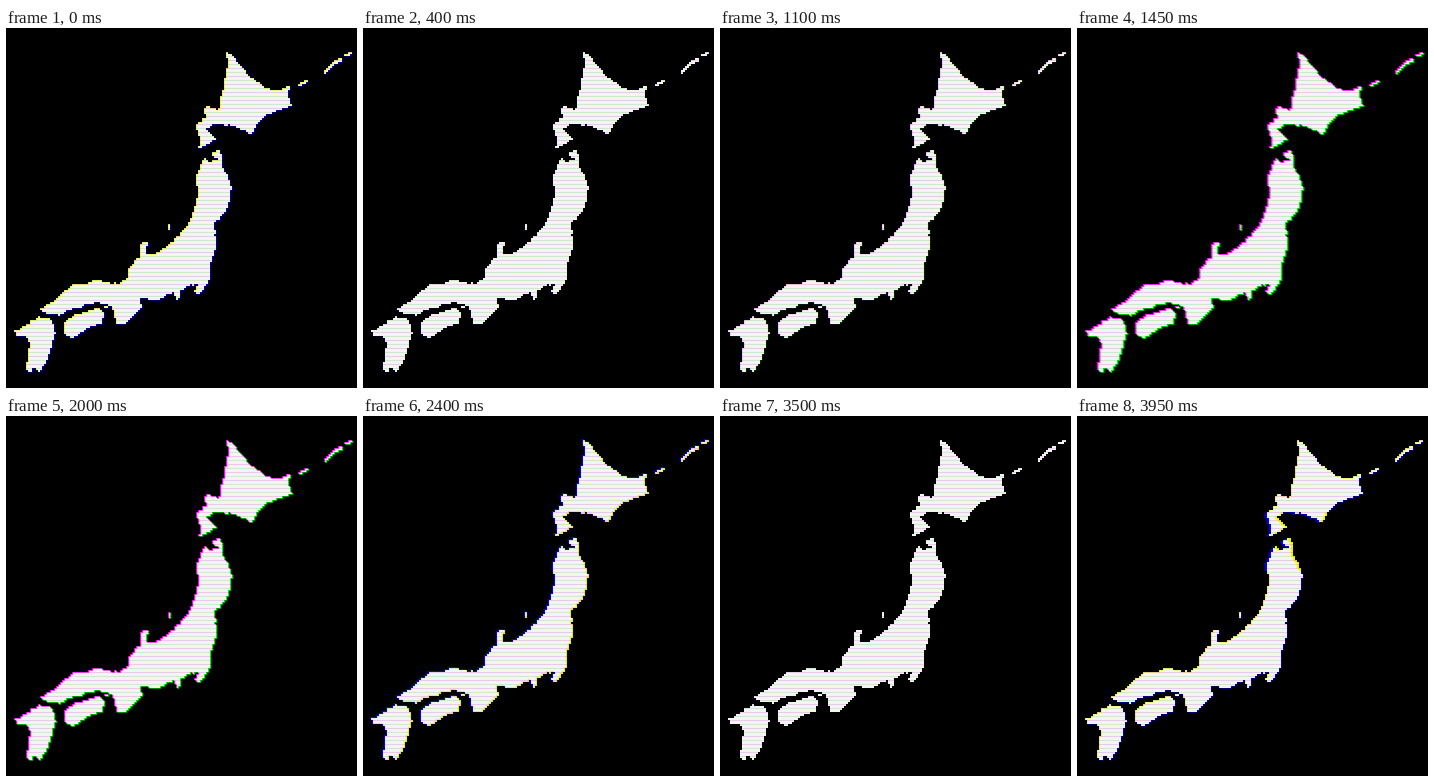
An HTML page with a canvas that plays this animation: 351x360 px, repeating every 4000 ms.

```html
<!DOCTYPE html>
<html lang="en">
<head>
<meta charset="utf-8">
<title>Glitching map</title>
<style>
  html, body { margin: 0; width: 100%; height: 100%; overflow: hidden; background: #000; }
  canvas { display: block; width: 351px; height: 360px; }
</style>
</head>
<body>
<canvas id="stage" width="351" height="360"></canvas>
<script>
const W = 351, H = 360, LOOP = 4000, STEP = 50, CELL = 2;
const RED = 0, GREEN = 1, BLUE = 2;

// main headlands and bays; the small roughness of the coast is generated
const coasts = [
  `221 24 229 30 246 50 260 60 276 62 284 57 281 67 285 78 262 85 251 95 246 107 233 99
   211 95 199 101 210 111 193 121 195 111 189 97 200 89 199 79 214 81 216 66 220 48`,
  `196 134 198 128 203 134 213 132 204 124 214 122 217 140 226 160 220 184 208 196 209 222
   203 240 204 250 196 263 189 265 191 255 175 262 172 272 168 264 149 273 133 269 136 279
   118 296 111 297 106 278 93 274 64 281 54 288 33 282 48 273 64 258 94 253 113 256 122 250
   122 241 134 229 134 216 142 213 139 226 150 226 168 213 183 196 191 170 190 148`,
  `58 294 66 289 84 283 91 279 98 286 95 296 84 298 66 310 58 306`,
  `8 302 20 297 32 289 46 292 49 304 40 335 32 345 27 336 25 345 20 340 24 316 20 308 10 308`
];

// islets as short strokes
const islets = 'M318 45L327 36L335 31 M339 28L345 25 M293 58L301 52 M163 197V202 M100 278V281';

// each pulse pulls one channel away from the others, then lets it return
const PULSE = 450;
const pulses = [
  { at: 0,    channel: BLUE,  x: 0.7,  y: 0.5 },
  { at: 750,  channel: BLUE,  x: -1.6, y: 1 },
  { at: 1450, channel: GREEN, x: 1.4,  y: 0.8 },
  { at: 2000, channel: GREEN, x: 1.2,  y: 0.7 },
  { at: 2400, channel: BLUE,  x: -1.2, y: -1 },
  { at: 3050, channel: RED,   x: -0.6, y: 0 }
];

// for one step a channel slips sideways inside a horizontal band
const tears = [
  { at: 3050, channel: RED,  top: 38, height: 7, slip: -4 },
  { at: 3950, channel: BLUE, top: 96, height: 59, slip: -3 }
];

function seeded(seed) {
  return () => (seed = seed * 16807 % 2147483647) / 2147483647;
}

function makeCanvas(w, h) {
  const c = document.createElement('canvas');
  c.width = w;
  c.height = h;
  return c;
}

function traceCoast(g, text, random) {
  const n = text.trim().split(/\s+/).map(Number);
  const jitter = () => (random() - 0.5) * 2.4;
  g.beginPath();
  for (let i = 0; i < n.length; i += 2) {
    const [x, y] = [n[i], n[i + 1]];
    const [dx, dy] = [n[(i + 2) % n.length] - x, n[(i + 3) % n.length] - y];
    const parts = Math.ceil(Math.hypot(dx, dy) / 4);
    g.lineTo(x, y);
    for (let k = 1; k < parts; k++) {
      g.lineTo(x + dx * k / parts + jitter(), y + dy * k / parts + jitter());
    }
  }
  g.fill();
}

function makeMask() {
  const w = Math.ceil(W / CELL), h = H / CELL;
  const c = makeCanvas(w, h), g = c.getContext('2d');
  const random = seeded(47);
  g.scale(1 / CELL, 1 / CELL);
  coasts.forEach(coast => traceCoast(g, coast, random));
  g.lineWidth = 3;
  g.stroke(new Path2D(islets));
  const img = g.getImageData(0, 0, w, h);
  for (let i = 3; i < img.data.length; i += 4) img.data[i] = img.data[i] > 110 ? 255 : 0;
  g.putImageData(img, 0, 0);
  return c;
}

function tinted(mask, color) {
  const c = makeCanvas(W, H), g = c.getContext('2d');
  g.imageSmoothingEnabled = false;
  g.drawImage(mask, 0, 0, mask.width * CELL, mask.height * CELL);
  g.globalCompositeOperation = 'source-in';
  g.fillStyle = color;
  g.fillRect(0, 0, W, H);
  return c;
}

const mask = makeMask();
const layers = ['#f40000', '#00f400', '#0000f4'].map(color => tinted(mask, color));
const ctx = document.getElementById('stage').getContext('2d');

function shiftOf(channel, t) {
  const shift = { x: 0, y: 0 };
  for (const p of pulses.filter(p => p.channel === channel)) {
    const gap = Math.abs(t - p.at);
    const near = Math.min(gap, LOOP - gap, PULSE);
    const pull = (1 + Math.cos(Math.PI * near / PULSE)) / 2;
    shift.x += p.x * pull;
    shift.y += p.y * pull;
  }
  return shift;
}

function drawBand(layer, x, y, top, bottom) {
  ctx.save();
  ctx.beginPath();
  ctx.rect(0, top, W, bottom - top);
  ctx.clip();
  ctx.drawImage(layer, x, y);
  ctx.restore();
}

function drawLayer(layer, channel, t) {
  const { x, y } = shiftOf(channel, t);
  const tear = tears.find(k => k.at === t && k.channel === channel);
  if (!tear) return ctx.drawImage(layer, x, y);
  const bottom = tear.top + tear.height;
  drawBand(layer, x, y, 0, tear.top);
  drawBand(layer, x + tear.slip, y, tear.top, bottom);
  drawBand(layer, x, y, bottom, H);
}

function drawScanlines() {
  ctx.globalCompositeOperation = 'multiply';
  for (let i = 0; i * 4 < H; i++) {
    ctx.fillStyle = i % 2 ? '#d2f6d2' : '#f6d2f6';
    ctx.fillRect(0, i * 4, W, 1);
  }
}

function draw(t) {
  ctx.globalCompositeOperation = 'source-over';
  ctx.fillStyle = '#000';
  ctx.fillRect(0, 0, W, H);
  ctx.globalCompositeOperation = 'lighter';
  layers.forEach((layer, channel) => drawLayer(layer, channel, t));
  drawScanlines();
}

const start = performance.now();
function tick() {
  const t = (performance.now() - start) % LOOP;
  draw(Math.floor(t / STEP) * STEP);
  requestAnimationFrame(tick);
}
tick();
</script>
</body>
</html>
```
